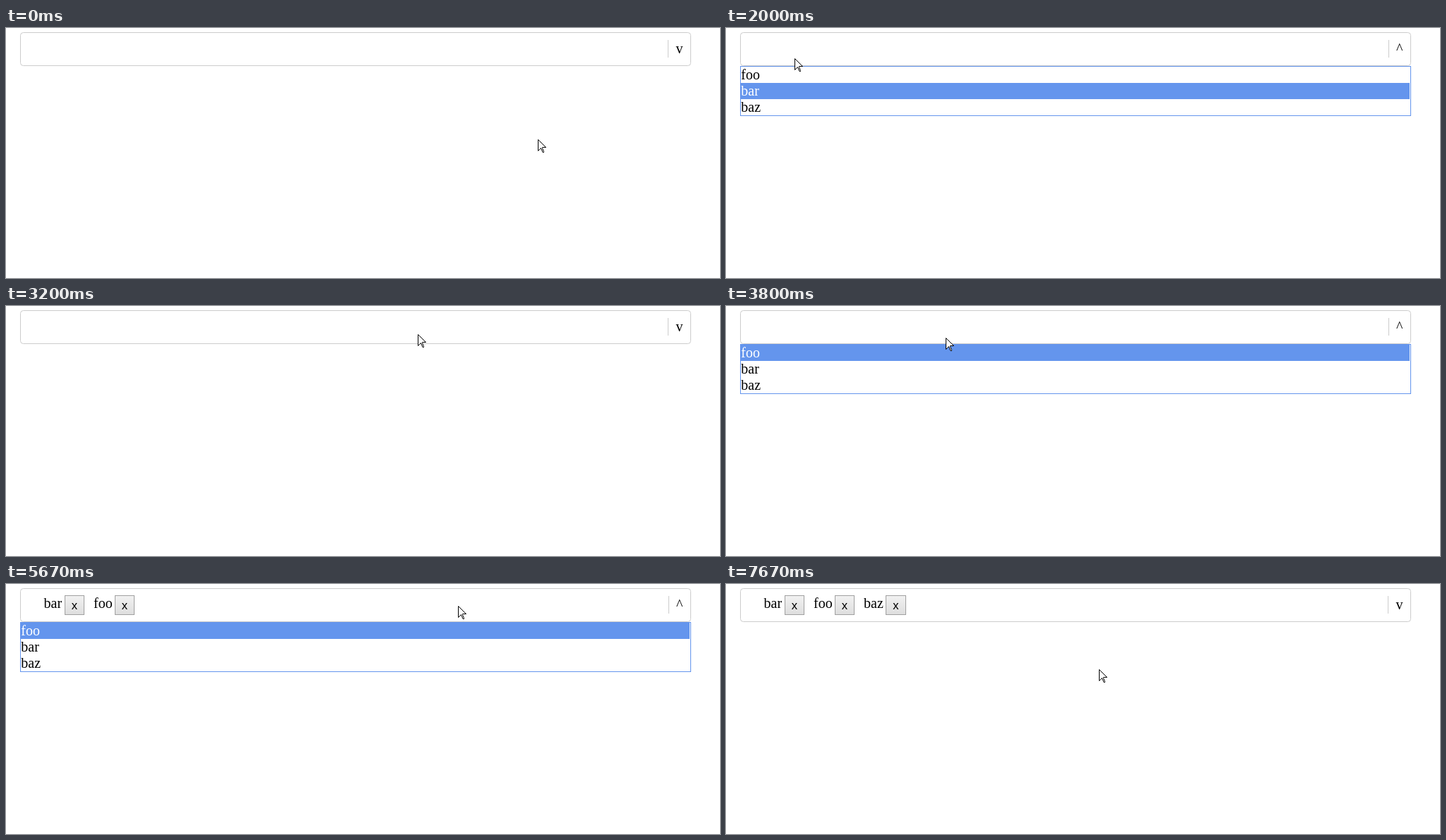
An HTML page with a canvas for the animation above (8000 ms loop, 1011x355 px).

```html
<!DOCTYPE html>
<html lang="en">
<head>
<meta charset="utf-8">
<title>Multi-select dropdown</title>
<style>
html, body { margin: 0; width: 100%; height: 100%; overflow: hidden; background: #fff; }
canvas { display: block; }
</style>
</head>
<body>
<canvas id="stage" width="1011" height="355"></canvas>
<script>
const ctx = document.getElementById('stage').getContext('2d');
const LOOP = 8000;
const STEPS_PER_MS = 15 / 1000;
const BLUE = '#6495ed', GREY = '#ccc';
const SERIF = '20px "Liberation Serif", "Times New Roman", serif';
const SANS = '16.67px "Liberation Sans", Arial, sans-serif';
const NONE = -1;
const items = ['foo', 'bar', 'baz'];
const rowEdges = [54, 78, 101, 124];

// label, label x, button x, button width
const chips = [['bar', 53.5, 83, 28], ['foo', 124, 154, 28], ['baz', 195, 226, 29]];

// step, menu open, highlighted row, chip count
const states = [
  [0, false, NONE, 0], [18, true, NONE, 0], [23, true, 0, 0], [25, true, 1, 0],
  [33, true, 2, 0], [35, true, NONE, 0], [41, false, NONE, 0], [53, true, NONE, 0],
  [56, true, 0, 0], [59, true, 1, 0], [64, true, 1, 1], [73, true, 0, 1],
  [85, true, 0, 2], [91, true, 1, 2], [98, true, 2, 2], [103, true, 2, 3],
  [112, true, NONE, 3], [115, false, NONE, 3]
];

// step, x, y of the pointer tip
const path = [
  [0, 753, 158], [6, 735, 78], [11, 757, 5], [21, 757, 5],
  [22, 715, 22], [23, 647, 42], [26, 420, 52], [30, 97, 43],
  [32, 50, 54], [34, 24, 76], [36, 6, 102], [37, 3, 114],
  [39, 8, 136], [41, 40, 142], [47, 495, 60], [50, 760, 1],
  [54, 760, 1], [55, 620, 16], [57, 311, 45], [60, 230, 52],
  [63, 205, 52], [69, 205, 52], [78, 640, 31], [87, 640, 31],
  [93, 632, 50], [95, 632, 50], [99, 618, 72], [109, 618, 72],
  [115, 528, 121], [120, 528, 121]
];

const pointer = new Path2D('M.5 .5V16.5L4.5 12.5L7 18.5H8.5V17.5L6.5 12.5V11.5H11.5Z');

function text(str, x, y, color = '#000', font = SERIF) {
  ctx.font = font;
  ctx.fillStyle = color;
  ctx.fillText(str, x, y);
}

function pointerAt(step) {
  const i = path.findIndex(p => p[0] > step);
  const [s0, x0, y0] = path[i - 1], [s1, x1, y1] = path[i];
  const u = (step - s0) / (s1 - s0);
  return [Math.round(x0 + (x1 - x0) * u), Math.round(y0 + (y1 - y0) * u)];
}

function drawField(open) {
  ctx.strokeStyle = GREY;
  ctx.beginPath();
  ctx.roundRect(20.5, 6.5, 949, 47, 4);
  ctx.stroke();
  ctx.fillStyle = GREY;
  ctx.fillRect(open ? 938 : 937, 17, 1, 25);
  text(open ? '^' : 'v', open ? 949 : 948.4, 36);
}

function drawChip([label, x, left, width]) {
  text(label, x, 34);
  const fill = ctx.createLinearGradient(0, 16, 0, 44);
  fill.addColorStop(0, '#f2f2f2');
  fill.addColorStop(1, '#ddd');
  ctx.fillStyle = fill;
  ctx.fillRect(left, 16, width, 28);
  ctx.strokeStyle = '#a0a0a0';
  ctx.strokeRect(left + .5, 16.5, width - 1, 27);
  text('x', left + width / 2 - 4.2, 36, '#000', SANS);
}

function drawMenu(hot) {
  ctx.strokeStyle = BLUE;
  ctx.strokeRect(20.5, 54.5, 949, 70);
  items.forEach((label, i) => {
    const top = rowEdges[i];
    if (i === hot) {
      ctx.fillStyle = BLUE;
      ctx.fillRect(20, top, 948, rowEdges[i + 1] - top);
    }
    text(label, 21.3, 73 + 23 * i, i === hot ? '#fff' : '#000');
  });
}

function drawPointer(x, y) {
  ctx.save();
  ctx.translate(x, y);
  ctx.fillStyle = '#fff';
  ctx.strokeStyle = '#000';
  ctx.fill(pointer);
  ctx.stroke(pointer);
  ctx.restore();
}

function draw(now) {
  // Motion advances in whole steps, 15 per second.
  const step = Math.min(119, Math.floor((now % LOOP + 3.5) * STEPS_PER_MS));
  const [, open, hot, count] = states.filter(s => s[0] <= step).pop();
  ctx.fillStyle = '#fff';
  ctx.fillRect(0, 0, 1011, 355);
  ctx.lineWidth = 1;
  drawField(open);
  chips.slice(0, count).forEach(drawChip);
  if (open) drawMenu(hot);
  drawPointer(...pointerAt(step));
}

let start;
function tick(now) {
  start ??= now;
  draw(now - start);
  requestAnimationFrame(tick);
}
draw(0);
requestAnimationFrame(tick);
</script>
</body>
</html>
```
